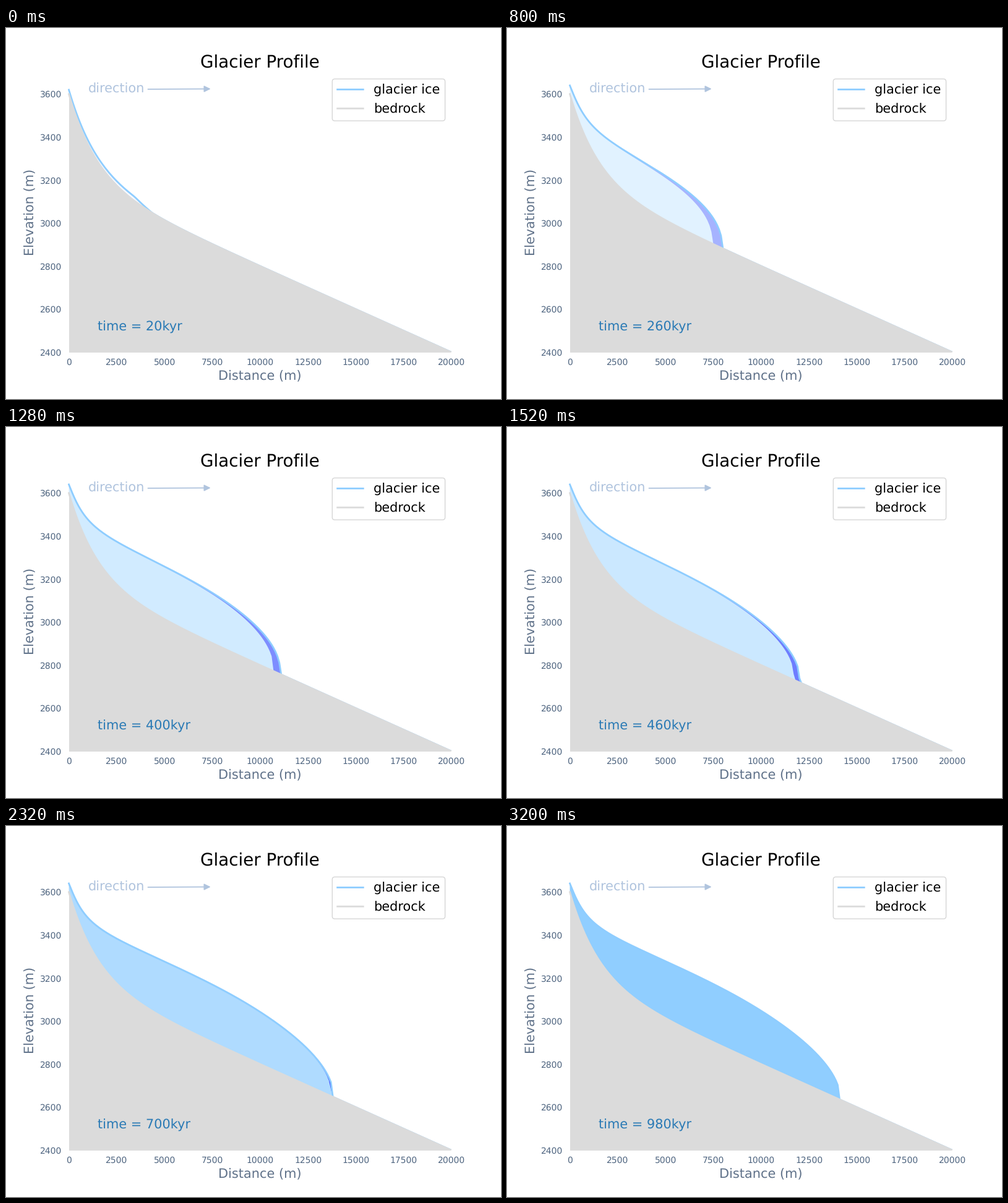
A matplotlib script for the animation above (3.28 s loop, 800 by 600 pixels).

```python
import numpy as np
import matplotlib.pyplot as plt
from matplotlib.animation import FuncAnimation

FRAMES, INTERVAL = 41, 80
STEP_YEARS, SUBSTEPS, RECORDS = 20, 2800, 49

ICE, ROCK, ADVANCE = "#8ecdff", "#dbdbdb", "#0000ff"
TICK, LABEL, CLOCK, HINT = "#4f6580", "#5f7189", "#2a7ab5", "#b0c4de"

# Shallow-ice flow: flux = K * slope^3 * thickness^5
K = 0.4 * 2.1e-16 * (900 * 9.81) ** 3
SNOW_LINE, MAX_SNOW = 3048, 1.0
LENGTH = 14170
DX = 100


def bed_height(x):
    return 3200 - 0.04 * x + 400 * np.exp(-x / 1500)


def leftover_flux(gradient, dx=10):
    """Integrate the steady profile upstream from its toe; return flux at the top."""
    pos, thick, flux = LENGTH - dx, 17.0, 5.0 * dx
    surface = bed_height(pos) + thick
    while pos > 0:
        surface += dx * (flux / (K * thick ** 5)) ** (1 / 3)
        pos -= dx
        thick = max(surface - bed_height(pos), 1.0)
        flux -= dx * min(gradient * (surface - SNOW_LINE), MAX_SNOW)
        if flux <= 0:
            return -1.0
    return flux


def balanced_gradient(lo=0.006, hi=0.03):
    for _ in range(24):
        mid = (lo + hi) / 2
        if leftover_flux(mid) > 0:
            hi = mid
        else:
            lo = mid
    return (lo + hi) / 2


def grow_glacier(bed, gradient):
    """Ice surface every STEP_YEARS, starting from bare rock."""
    dt = STEP_YEARS / SUBSTEPS
    thick = np.zeros_like(bed)
    flux = np.zeros(len(bed) + 1)
    scale = K / DX ** 3 / 32
    history = [bed.copy()]
    for _ in range(RECORDS):
        for _ in range(SUBSTEPS):
            surface = bed + thick
            drop = surface[:-1] - surface[1:]
            pair = thick[:-1] + thick[1:]
            square = pair * pair
            flux[1:-1] = scale * drop * drop * drop * square * square * pair
            snow = np.minimum(gradient * (surface - SNOW_LINE), MAX_SNOW)
            thick += dt * (snow - (flux[1:] - flux[:-1]) / DX)
            np.maximum(thick, 0, out=thick)
        history.append(bed + thick)
    return history


x = np.arange(0, 20000 + DX, DX, dtype=float)
bed = bed_height(x)
history = grow_glacier(bed, balanced_gradient())

plt.rcParams.update({"font.family": "DejaVu Sans", "text.hinting": "no_hinting"})
fig = plt.figure(figsize=(8, 6), dpi=100, facecolor="white")
ax = fig.add_axes([0.125, 0.126, 0.775, 0.754])
ax.set_xlim(-50, 20000)
ax.set_ylim(2400, 3700)
ax.set_xticks(range(0, 20001, 2500))
ax.set_yticks(range(2400, 3601, 200))
ax.tick_params(length=0, pad=7, labelsize=10, labelcolor=TICK)
for spine in ax.spines.values():
    spine.set_visible(False)

ax.set_title("Glacier Profile", fontsize=20)
ax.set_xlabel("Distance (m)", fontsize=15, color=LABEL)
ax.set_ylabel("Elevation (m)", fontsize=15, color=LABEL)


def band(top, bottom):
    return np.column_stack([np.r_[x, x[::-1]], np.r_[top, bottom[::-1]]])


ice_body, = ax.fill(*band(bed, bed).T, color=ICE, lw=0, zorder=1)
new_ice, = ax.fill(*band(bed, bed).T, color=ADVANCE, lw=0, zorder=1.5)
ice_line, = ax.plot(x, bed, color=ICE, lw=2, zorder=2, label="glacier ice")
ax.fill_between(x, 2400, bed, color=ROCK, lw=0, zorder=2.5)
ax.plot(x, bed, color=ROCK, lw=2, zorder=3, label="bedrock")
clock = ax.text(1500, 2500, "", fontsize=15, color=CLOCK, zorder=4)
ax.annotate("direction", xy=(7500, 3624), xytext=(1000, 3605), fontsize=15,
            color=HINT, arrowprops=dict(arrowstyle="-|>", color=HINT, lw=1.3))
legend = ax.legend(loc="upper right", fontsize=15)
for part in (legend.get_frame(), *legend.get_lines()):
    part.set_snap(False)


def update(i):
    # every sixth record is skipped
    n = i + i // 5 + 1
    years = n * STEP_YEARS
    now, before = history[n], history[n - 1]
    ice_body.set_xy(band(now, bed))
    new_ice.set_xy(band(np.maximum(now, before), before))
    for patch in (ice_body, new_ice):
        patch.set_alpha(years / 1000)
    ice_line.set_ydata(now)
    clock.set_text(f"time = {years}kyr")
    return ice_body, new_ice, ice_line, clock


anim = FuncAnimation(fig, update, frames=FRAMES, interval=INTERVAL,
                     repeat=True, repeat_delay=0)
plt.show()
```
